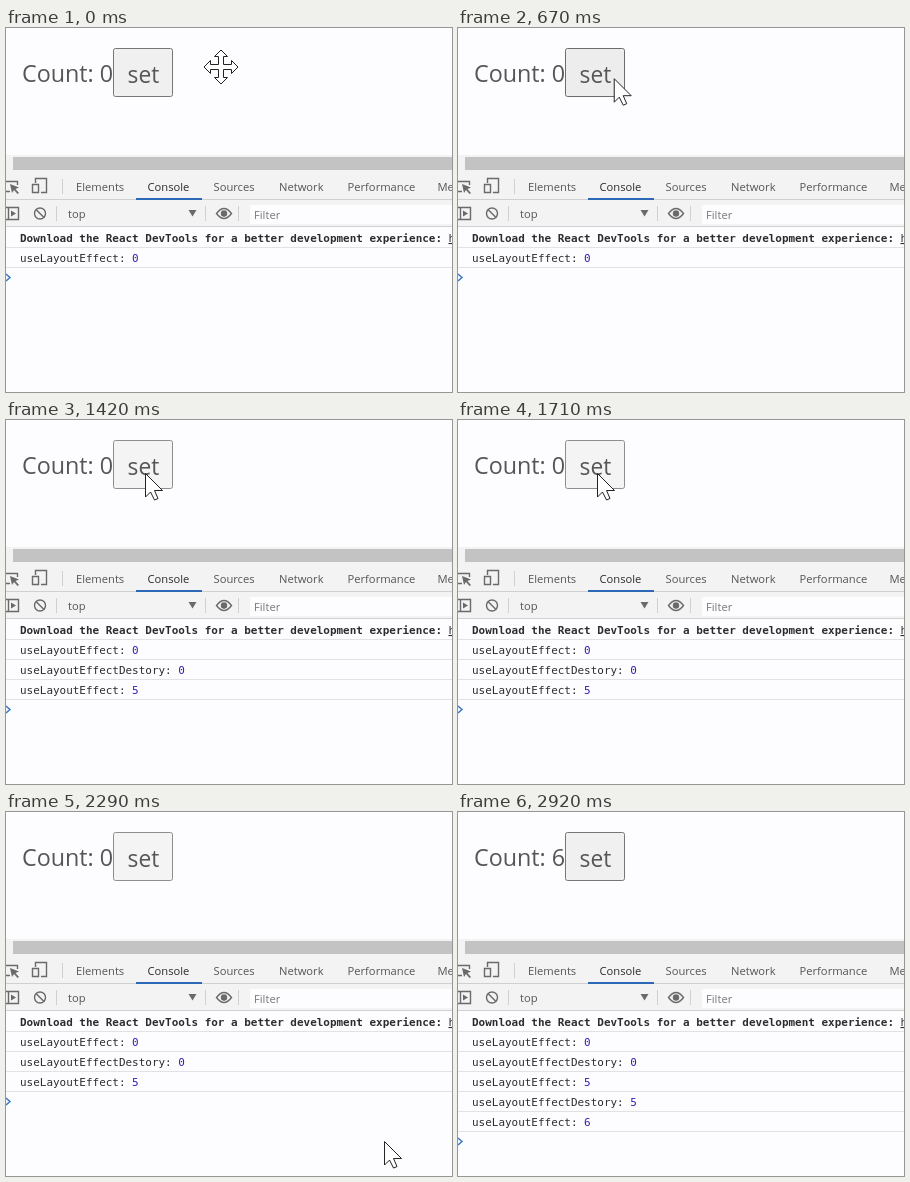
Write an HTML page that moves like this. It is 446 px wide and 364 px high and loops after 3.37 s.

```html
<!DOCTYPE html>
<html lang="en">
<head>
<meta charset="utf-8">
<title>useLayoutEffect demo</title>
<style>
  html, body { margin: 0; width: 100%; height: 100%; overflow: hidden; background: #fdfdff; }
  svg { display: block; }
  .page { font: 23.3px "Open Sans", "Noto Sans", sans-serif; fill: #565656; }
  .ui { font: 11.2px "Open Sans", "Noto Sans", sans-serif; fill: #555; }
  .log { font: 10.96px "DejaVu Sans Mono", monospace; fill: #2c2c2c; white-space: pre; }
  .icon { fill: none; stroke: #6a6a6a; stroke-width: 1.4; }
  .icon .solid { fill: #6a6a6a; stroke: none; }
  .rule { stroke: #d0d0d0; }
  .row { stroke: #e2e2e4; }
  .cursor { fill: #fff; stroke: #222; }
</style>
</head>
<body>
<svg width="446" height="364" viewBox="0 0 446 364">
  <rect width="446" height="364" fill="#fdfdff"/>

  <g class="page">
    <text id="count" x="16" y="54"></text>
    <rect id="button" x="107.5" y="20.5" width="59" height="48" rx="2"/>
    <text x="121.5" y="55" font-size="22.8">set</text>
  </g>

  <rect y="127" width="446" height="72" fill="#f3f3f3"/>
  <rect x="7" y="129" width="439" height="13" fill="#c3c3c3"/>
  <rect id="hover" x="262" y="146" width="67" height="25" fill="#e6e6e6"/>
  <rect x="244" y="177" width="202" height="19" fill="#fdfdff"/>
  <path class="rule" d="M0 171.5H446M0 198.5H446M56.5 151v15M50.5 178v15M199.5 178v15M232.5 178v15"/>
  <rect x="130" y="170" width="66" height="2" fill="#2c68b8"/>

  <g class="ui">
    <text x="70" y="163">Elements</text>
    <text x="141.5" y="163" fill="#2c2c2c">Console</text>
    <text x="207.5" y="163">Sources</text>
    <text x="273" y="163">Network</text>
    <text x="341.5" y="163">Performance</text>
    <text x="431.5" y="163">Memory</text>
    <text x="62" y="190">top</text>
    <text x="248" y="191" fill="#777">Filter</text>
  </g>

  <g class="icon">
    <path d="M0 153.5H11.5V157M0 163.5H4"/>
    <path class="solid" d="M4 156l9 3.5-3.5 1.5 3.5 4-1.5 1-3.5-4-2 3z"/>
    <path d="M29.5 155V150.5H40.5V164.5H35M26.5 156.5h6v8h-6z"/>
    <path d="M0 179.5H12.5V191.5H0M2.5 180V191"/>
    <path class="solid" d="M5 182.5l5 3-5 3z"/>
    <circle cx="34" cy="185.5" r="5.5"/>
    <path d="M30 181.5l8 8"/>
    <path class="solid" d="M182.5 182h8l-4 6.5z"/>
    <path d="M210.5 185.5q7.5-10 15 0q-7.5 10-15 0z"/>
    <circle class="solid" cx="218" cy="185.5" r="3.2"/>
  </g>

  <g class="log">
    <text x="14" y="214" font-weight="bold">Download the React DevTools for a better development experience: </text>
    <text x="442.5" y="214" text-decoration="underline">https</text>
    <path class="row" d="M0 219.5H446"/>
    <g id="rows"></g>
  </g>
  <path id="prompt" d="M0-3.5L4 0L0 3.5" fill="none" stroke="#3b78c4" stroke-width="1.5"/>
  <path id="cursor" class="cursor"/>
</svg>

<script>
const LOOP = 3370, CLICK = 1250, RENDER = 2500;
const $ = id => document.getElementById(id);

const shapes = {
  move: "M0-17L6.5-10.5H2.5V-2.5H10.5V-6.5L17 0L10.5 6.5V2.5H2.5V10.5H6.5L0 17L-6.5 10.5H-2.5V2.5H-10.5V6.5L-17 0L-10.5-6.5V-2.5H-2.5V-10.5H-6.5Z",
  arrow: "M.5.5V24L5.5 19L9.5 27L13 25.5L9.5 17.5H17.5Z",
  hand: "M-2.5 2Q-2.5 0-.5 0Q1.500 0 1.500 2V10Q6 8 6 11Q10 9 10 12Q13.500 11 13.500 14V20Q13.500 23 11 26V29.500H1V26Q-3 22-7 16Q-6 13-4 15L-2.500 17Z"
};

// time, x, y
const path = [
  [0, 215, 39], [250, 215, 39], [251, 213, 39], [420, 213, 39], [580, 175, 47], [750, 139, 53],
  [1880, 139, 53], [2000, 283, 190], [2040, 284, 196], [2290, 378, 329], [2380, 380, 333],
  [2460, 380, 333], [2600, 383, 370], [LOOP, 383, 370]
];

// time, label, value
const logs = [
  [0, "useLayoutEffect", 0],
  [CLICK + 80, "useLayoutEffectDestory", 0],
  [CLICK + 80, "useLayoutEffect", 5],
  [RENDER, "useLayoutEffectDestory", 5],
  [RENDER, "useLayoutEffect", 6]
];

$("rows").innerHTML = logs.map(([, label, value], i) =>
  `<g><text x="14" y="${234 + 20 * i}">${label}: <tspan fill="#3020b4">${value}</tspan></text>
   <path class="row" d="M0 ${239.5 + 20 * i}H446"/></g>`).join("");
const rows = [...$("rows").children];

const ramp = (t, from, to) => Math.min(1, Math.max(0, (t - from) / (to - from)));
const gray = level => `rgb(${Array(3).fill(Math.round(level))})`;

function position(t) {
  const i = path.findIndex(p => p[0] > t);
  const [t0, x0, y0] = path[i - 1], [t1, x1, y1] = path[i];
  const k = ramp(t, t0, t1);
  return [x0 + (x1 - x0) * k, y0 + (y1 - y0) * k];
}

function draw(t) {
  const [x, y] = position(t);
  const overTab = t >= 1960 && t < 2080;
  const shape = t < 250 ? "move" : overTab ? "hand" : "arrow";
  $("cursor").setAttribute("d", shapes[shape]);
  $("cursor").setAttribute("transform", `translate(${x} ${y})`);
  $("hover").style.display = overTab ? "" : "none";

  const hot = ramp(t, 620, 800) * (1 - ramp(t, CLICK, CLICK + 160));
  const pressed = ramp(t, CLICK, CLICK + 160) * (1 - ramp(t, RENDER, RENDER + 300));
  $("button").style.fill = gray(240 - 11 * hot + 4 * pressed);
  $("button").style.stroke = gray(118 - 34 * hot + 24 * pressed);

  $("count").textContent = "Count: " + (t < RENDER ? 0 : 6);
  rows.forEach((row, i) => row.style.display = t >= logs[i][0] ? "" : "none");
  const shown = logs.filter(l => t >= l[0]).length;
  $("prompt").setAttribute("transform", `translate(0 ${229.5 + 20 * shown})`);
}

const start = performance.now();
function frame() {
  draw((performance.now() - start) % LOOP);
  requestAnimationFrame(frame);
}
frame();
</script>
</body>
</html>
```
